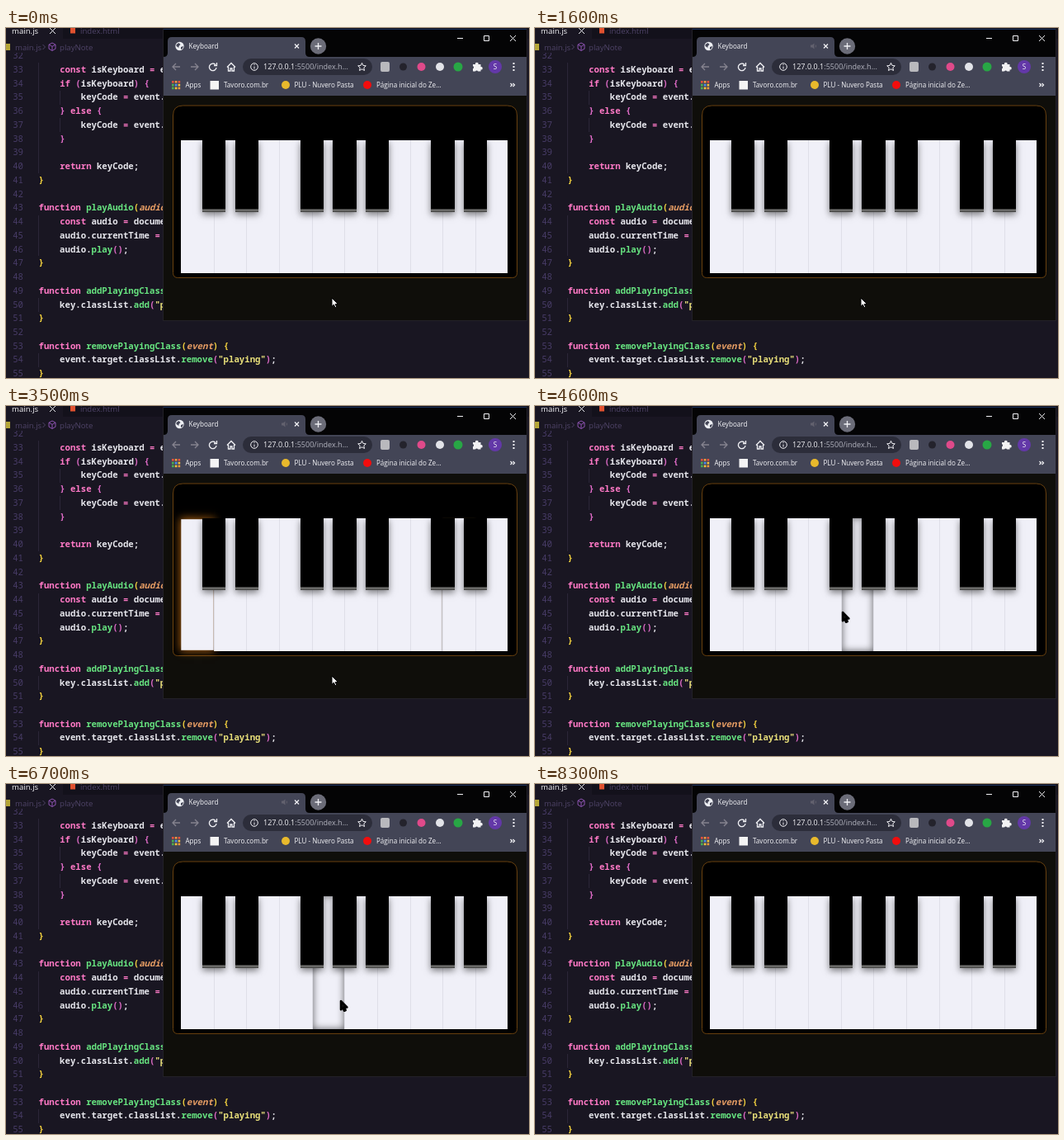
Write an HTML page that moves like this. It is 634x424 px and loops after 8500 ms.

```html
<!DOCTYPE html>
<html lang="en">
<head>
<meta charset="utf-8">
<title>Keyboard</title>
<style>
  html, body { margin: 0; width: 100%; height: 100%; overflow: hidden; background: #191622; }
  #stage { position: relative; width: 634px; height: 424px; overflow: hidden; }
  svg { position: absolute; left: 0; top: 0; }
  .code { font: 600 10.68px "Noto Sans Mono", monospace; white-space: pre; }
  .ui { font-family: "Open Sans", sans-serif; font-size: 8.1px; fill: #f4f4f7; }
  .line { fill: none; stroke: #f0f0f4; stroke-width: 1.3; }
  .dim { stroke: #85838f; }
  .key { position: absolute; box-sizing: border-box; }
  .white {
    top: 136px; width: 39.65px; height: 161px;
    background: #f0f0f8; border-left: 1px solid #dfdfe8;
  }
  .white:first-child { border-left: 0; }
  .black {
    top: 136px; width: 28.4px; height: 87px; transform-origin: 50% 0;
    background: linear-gradient(#000 83px, #777775 84px, #5c5c5a 86px, #333 87px);
  }
</style>
</head>
<body>
<div id="stage">
  <svg width="634" height="424">
    <rect width="634" height="424" fill="#191622"/>
    <path d="M39.5 42V176M65.5 76V93M65.5 109V126M39.5 227V276M39.5 327V344M39.5 394V411" stroke="#2b2638" fill="none"/>
    <g id="code" class="code"></g>

    <rect width="634" height="13" fill="#13111b"/>
    <rect width="69" height="13" fill="#191622"/>
    <rect y="13" width="191" height="17" fill="#191622"/>
    <g class="ui" style="font-size:9.6px">
      <text x="7" y="7">main.js</text>
      <path class="line" d="M53 0l7 7m0-7l-7 7" style="stroke-width:1"/>
      <rect x="78" y="0" width="6" height="6.500" fill="#e0512f"/>
      <text x="90" y="7" fill="#4f4468">index.html</text>
      <rect y="19" width="5" height="8" fill="#b5a637"/>
      <g fill="#4f4468">
        <text x="11" y="26.500">main.js</text>
        <text x="65" y="26.500">playNote</text>
      </g>
      <path class="line" d="M44.500 20l3 3-3 3" style="stroke:#4f4468;stroke-width:1"/>
      <path class="line" d="M56 18l4 2.200v5L56 27.500l-4-2.300v-5zM52 20.200l4 2.200 4-2.200M56 22.400v5" style="stroke:#8c52b0;stroke-width:1"/>
    </g>

    <rect x="190.500" y="1.500" width="441" height="353" fill="#0f0e0a" stroke="#232128"/>
    <rect x="191" y="2" width="440" height="33" fill="#040405"/>
    <path d="M191 1.500H631" stroke="#1b315c"/>
    <path d="M191 35q5 0 5-5V16q0-5 5-5H358q5 0 5 5V30q0 5 5 5H631V82H191z" fill="#434556"/>
    <g class="ui">
      <circle cx="210.500" cy="22" r="5.200" fill="#eceef2"/>
      <path d="M206.500 20l3-2 2 2-2 2v2l-3-2zM212 23l3-1-1 3-2 1z" fill="#434556"/>
      <text x="221.500" y="25">Keyboard</text>
      <path id="speaker" d="M334 20.500h2l2.500-2v7l-2.500-2h-2zM340 20q2 2 0 4" fill="#62616e"/>
      <path class="line" d="M350 19.500l5 5m0-5l-5 5"/>
      <circle cx="378.500" cy="22" r="9.700" fill="#6b6c78"/>
      <path class="line" d="M374.500 22h8m-4-4v8"/>
      <path class="line" d="M547 12.500h7M579.500 9.500h6v6h-6zM611 9l7 7m0-7l-7 7" style="stroke-width:1"/>

      <path class="line dim" d="M211 47h-9m4-4l-4 4 4 4M224 47h9m-4-4l4 4-4 4"/>
      <path class="line" d="M254 44.500a4.300 4.300 0 1 0 1 3.500M255.500 42v3.500h-3.500M268 47.500l5-5 5 5M269.500 47v5h2.500v-3h2v3h2.500v-5"/>
      <rect x="287" y="37" width="157" height="20" rx="10" fill="#2c2d3a"/>
      <circle class="line" cx="301" cy="47" r="4.300" style="stroke-width:1"/>
      <path class="line" d="M301 46.500v3M301 44v1" style="stroke-width:1"/>
      <text x="312" y="50.300" style="font-size:9.050px">127.0.0.1<tspan fill="#b4b5c0">:5500/index.h...</tspan></text>
      <path class="line" d="M431.500 42.300l1.400 3.100 3.400.4-2.500 2.300.7 3.400-3-1.700-3 1.700.7-3.400-2.500-2.300 3.400-.4z" style="stroke-width:1"/>
      <rect x="454" y="41" width="11" height="12" rx="2" fill="#b9b9bd"/>
      <circle cx="481.500" cy="47" r="4.500" fill="#24232c"/>
      <circle cx="503.500" cy="47" r="5" fill="#e04a8a"/>
      <circle cx="526" cy="47" r="5" fill="#e2e3e8"/>
      <circle cx="548" cy="47" r="5.500" fill="#28a745"/>
      <path d="M566 44h3a1.800 1.800 0 1 1 3.500 0h3v3a1.800 1.800 0 1 1 0 3.500v2h-3.300a1.800 1.800 0 0 0-3.200 0h-3v-3.200a1.800 1.800 0 0 0 0-3.300z" fill="#f2f2f4"/>
      <circle cx="593" cy="47" r="8" fill="#6338a8"/>
      <text x="593" y="50" text-anchor="middle">S</text>
      <path d="M614.500 42h2v2h-2zm0 4h2v2h-2zm0 4h2v2h-2z" fill="#f2f2f4"/>

      <g id="apps"></g>
      <text x="217.500" y="72">Apps</text>
      <rect x="247.500" y="64" width="10.500" height="10.500" fill="#f4f4f4"/>
      <text x="264" y="72">Tavoro.com.br</text>
      <circle cx="339" cy="69" r="5" fill="#e8b92c"/>
      <text x="349.500" y="72">PLU - Nuvero Pasta</text>
      <circle cx="438" cy="69" r="5" fill="#f20d0d"/>
      <text x="449" y="72">Página inicial do Ze...</text>
      <path class="line" d="M611.500 67l2 2-2 2m3-4l2 2-2 2"/>
    </g>
    <path d="M202.500 106q0-12 12-12H607.500q12 0 12 12V296.500q0 6-6 6H208.500q-6 0-6-6z" fill="#000" stroke="#68400f"/>
  </svg>
  <div id="whites"></div>
  <div id="blacks"></div>
  <svg width="634" height="424">
    <path id="cursor" d="M0 0V10.300L2.400 8.100 4 11.800 5.700 11 4.200 7.500H7.400Z" stroke="#000" stroke-linejoin="round"/>
  </svg>
</div>
<script>
const $ = id => document.getElementById(id);
const LOOP = 8500, STEP = 100;

// Editor text
const source = `
    const isKeyboard = event instanceof KeyboardEvent;
    if (isKeyboard) {
        keyCode = event.keyCode;
    } else {
        keyCode = event.target.dataset.key;
    }

    return keyCode;
}

function playAudio(audio) {
    const audio = document.querySelector("audio");
    audio.currentTime = 0;
    audio.play();
}

function addPlayingClass(key) {
    key.classList.add("playing");
}

function removePlayingClass(event) {
    event.target.classList.remove("playing");
}`.split("\n");

const token = /(\b(?:const|if|else|return|function|instanceof)\b|=)|("\w+")|((?<=function \w+\()\w+)|(\w+(?=\())|([(){}])/g;
const span = (text, fill, extra = "") => `<tspan fill="${fill}" ${extra}>${text}</tspan>`;

function paint(line) {
  const bracket = line.startsWith(" ") ? "#e06cc8" : "#f5d33f";
  return line.replace(token, (s, word, string, param, name) =>
    word ? span(s, "#ff79c6") :
    string ? span(s, "#e7de79") :
    param ? span(s, "#e89e64", 'font-style="italic"') :
    name ? span(s, "#67e480") : span(s, bracket));
}

$("code").innerHTML = source.map((line, i) => {
  const y = 37.2 + i * 16.74;
  return `<text x="21" y="${y}" fill="#483c67" font-weight="400" text-anchor="end">${32 + i}</text>` +
    `<text x="39.5" y="${y}" fill="#e6e6ec" style="white-space:pre">${paint(line)}</text>`;
}).join("");

const dots = ["#e8503e", "#f29a3a", "#e8503e", "#4cae50", "#4a8df0", "#f2c23a", "#4cae50", "#f2c23a", "#f29a3a"];
$("apps").innerHTML = dots.map((c, i) =>
  `<rect x="${201 + i % 3 * 3.8}" y="${64 + (i / 3 | 0) * 3.8}" width="2.6" height="2.6" fill="${c}"/>`).join("");

// Piano
const LEFT = 212, PITCH = 39.65;

function addKey(parent, kind, x) {
  const el = document.createElement("div");
  el.className = "key " + kind;
  el.style.left = x + "px";
  parent.append(el);
  return el;
}
const whites = Array.from({ length: 10 }, (_, i) => addKey($("whites"), "white", LEFT + i * PITCH));
const blacks = [1, 2, 4, 5, 6, 8, 9].map(n => addKey($("blacks"), "black", LEFT + n * PITCH - 13.8));

// key, press time, release time
const presses = [
  [whites[0], 500, 700], [whites[1], 900, 1200],
  [blacks[5], 1800, 2000], [whites[7], 2600, 2900],
  [whites[8], 3100, 3500], [whites[0], 3400, 3700],
  [whites[4], 4600, 4900], [blacks[2], 5400, 5700],
  [whites[4], 6700, 7000], [whites[6], 7200, 7400], [blacks[5], 7600, 7800]
];

// time, x, y
const path = [
  [0, 395, 327], [4100, 395, 327], [4500, 373, 250], [5000, 373, 250],
  [5200, 375, 195], [5700, 375, 195], [6200, 406, 263], [6800, 406, 263],
  [7100, 470, 255], [7300, 470, 255], [7500, 526, 200], [7700, 526, 200],
  [8000, 506, 359], [8200, 485, 408]
];

function keyState(el, t) {
  const press = presses.find(p => p[0] === el && t >= p[1] && t <= p[2]);
  if (!press) return "idle";
  return t === press[1] ? "fresh" : t === press[2] ? "released" : "held";
}

function drawKey(el, t) {
  const state = keyState(el, t), black = blacks.includes(el);
  const shadows = [];
  if (state === "held") shadows.push("0 0 10px 1px rgba(225,130,25,.75)");
  if (state === "released") shadows.push("0 0 2px rgba(60,40,20,.7)");
  if (black && state !== "fresh") shadows.push("0 3px 8px rgba(0,0,0,.5)");
  if (!black && state === "fresh") shadows.push("inset 0 0 10px rgba(0,0,0,.6)");
  el.style.boxShadow = shadows.join() || "none";
  const down = state === "held" || black && state === "fresh";
  el.style.transform = !down ? "none" : black ? "scaleY(.975)" : "scale(.985)";
}

function drawCursor(t) {
  const i = path.findIndex(p => p[0] > t);
  const b = i < 0 ? path.at(-1) : path[i];
  const a = i < 0 ? b : path[i - 1];
  const k = b === a ? 0 : (t - a[0]) / (b[0] - a[0]);
  const e = k * k * (3 - 2 * k);
  const x = a[1] + (b[1] - a[1]) * e, y = a[2] + (b[2] - a[2]) * e;
  const overWhite = y > 223 && y < 297;
  const cursor = $("cursor");
  cursor.style.display = t > 8200 ? "none" : "";
  cursor.setAttribute("transform", `translate(${x} ${y})`);
  cursor.setAttribute("fill", overWhite ? "#111" : "#fff");
  cursor.setAttribute("stroke-width", overWhite ? 2.5 : 1);
}

let last = -1;
function frame() {
  const t = Math.floor(performance.now() % LOOP / STEP) * STEP;
  if (t !== last) {
    last = t;
    for (const el of [...whites, ...blacks]) drawKey(el, t);
    drawCursor(t);
    $("speaker").style.display = t < 700 ? "none" : "";
  }
  requestAnimationFrame(frame);
}
frame();
</script>
</body>
</html>
```
